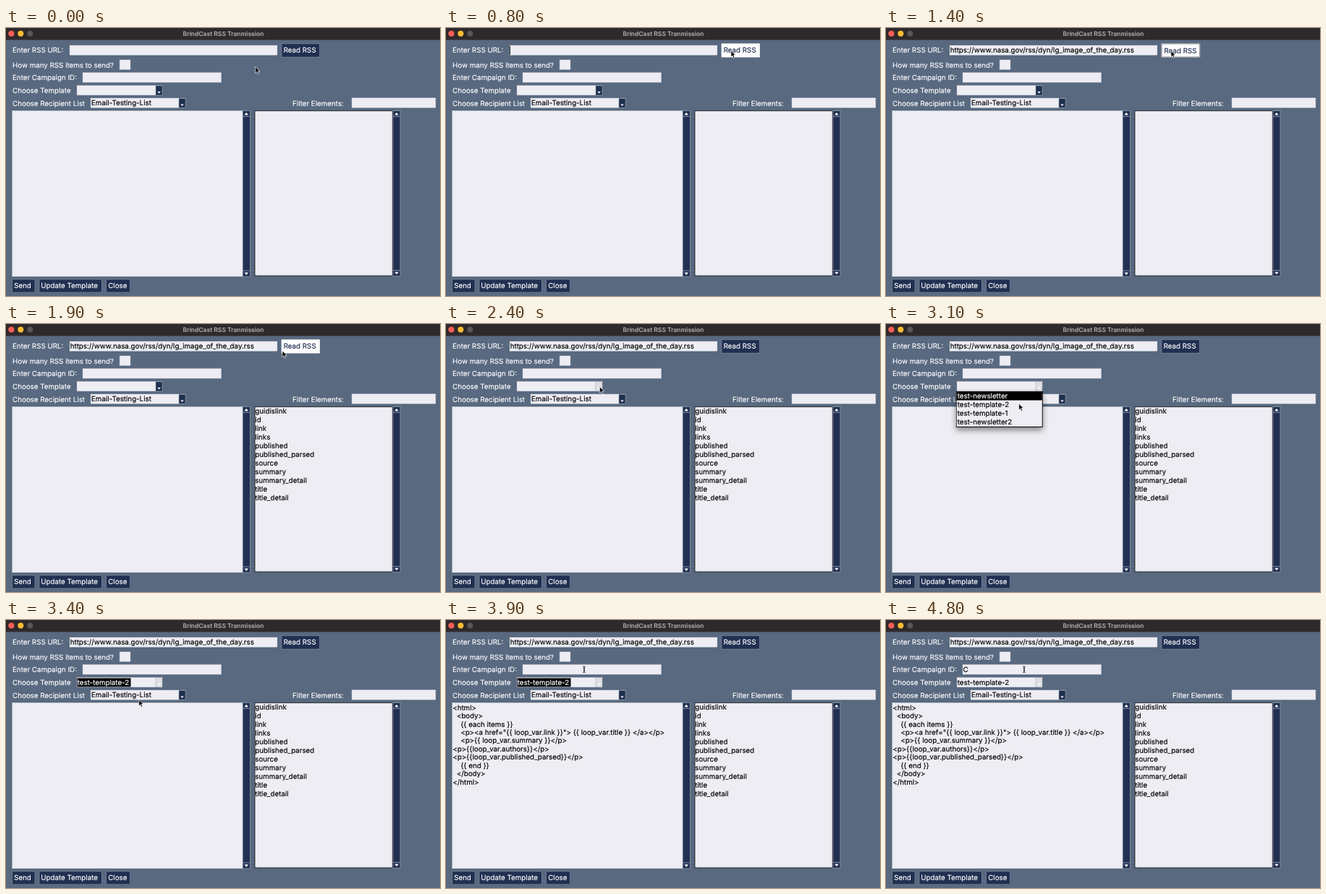
Animation, 600 px wide and 371 px high, one loop 5000 ms. Source, as an HTML page:

```html
<!DOCTYPE html>
<html lang="en">
<head>
<meta charset="utf-8">
<title>RSS form</title>
<style>
  html, body { margin: 0; width: 100%; height: 100%; overflow: hidden; background: #586980; }
  svg { display: block; width: 100%; height: 100%; }
  text {
    font: 9.77px Inter, "Open Sans", sans-serif;
    white-space: pre;
    text-rendering: geometricPrecision;
    stroke-width: .15px;
  }
  .title { font-size: 8.5px; font-weight: 600; }
</style>
</head>
<body>
<svg id="stage" viewBox="0 0 600 371"></svg>
<script>
const LOOP = 5000, STEP = 100;
const NAVY = '#213052', FIELD = '#ededf3', WHITE = '#fff', BLACK = '#000', ACTIVE = '#dfdfe4';
const stage = document.getElementById('stage');

function add(tag, attrs, parent = stage) {
  const node = document.createElementNS('http://www.w3.org/2000/svg', tag);
  for (const key in attrs) node.setAttribute(key, attrs[key]);
  parent.appendChild(node);
  return node;
}
const group = () => add('g', {});
const box = (x, y, right, bottom, fill, parent, extra) =>
  add('rect', { x, y, width: right - x, height: bottom - y, fill, ...extra }, parent);
function label(x, y, words, fill = WHITE, parent = stage, extra = {}) {
  const node = add('text', { x, y, fill, stroke: fill, ...extra }, parent);
  node.textContent = words;
  return node;
}
const lines = (x, y, pitch, rows, parent) =>
  rows.map((row, i) => label(x, y + i * pitch, row, BLACK, parent));
const show = (node, on) => node.setAttribute('visibility', on ? 'visible' : 'hidden');

const field = (x, y, right, bottom) =>
  box(x, y, right, bottom, FIELD, stage, { stroke: '#a9b0bb', 'stroke-width': .4 });

function button(x, y, right, bottom, words, textX) {
  const face = box(x, y, right, bottom, NAVY, stage, { stroke: '#8b919b', 'stroke-width': .6 });
  return { face, text: label(textX, (y + bottom) / 2 + 3.3, words) };
}

function combo(x, y, right, bottom) {
  field(x, y, right, bottom);
  const arrow = box(right - 9, y + .4, right, bottom, NAVY, stage, { stroke: '#9aa1ad', 'stroke-width': .5 });
  add('path', { d: `M${right - 6.7} ${y + 8.5}h4.6l-2.3 2.6z`, fill: WHITE });
  return arrow;
}

function scrollbar(x, bottom) {
  box(x, 114.5, x + 10, bottom, NAVY, stage, { stroke: '#aab0ba', 'stroke-width': .6 });
  for (const y of [122.5, bottom - 8])
    box(x, y - .3, x + 10, y + .3, '#b6bcc6');
  add('path', { d: `M${x + 2.2} 120.5h5.6l-2.8-3.6zM${x + 2.2} ${bottom - 5.6}h5.6l-2.8 3.6z`, fill: WHITE });
}

// Window and form
box(0, 0, 600, 371, '#586980');
box(0, 0, 600, 16.5, '#2e292b');
['#ff5f57', '#febc2e', '#5a5557'].forEach((fill, i) => add('circle', { cx: 7.3 + i * 13, cy: 7.8, r: 4, fill }));
label(300.5, 10.7, 'BrindCast RSS Tranmission', '#aaa6a7', stage, { class: 'title', 'text-anchor': 'middle' });

label(9, 34.3, 'Enter RSS URL:');
field(88, 24, 375, 37.7);
const readButton = button(381, 21.8, 433.7, 40.2, 'Read RSS', 383.7);
label(9, 54.5, 'How many RSS items to send?');
field(157, 44, 172, 57.7);
label(9, 72.3, 'Enter Campaign ID:');
field(106, 61.7, 297.7, 75.3);
label(9, 90.2, 'Choose Template');
const templateArrow = combo(98, 79.5, 216, 93);
label(9, 107.6, 'Choose Recipient List');
combo(117, 97, 248, 110.5);
label(118, 107.3, 'Email-Testing-List', BLACK);
label(396, 107.6, 'Filter Elements:');
field(478, 96.8, 594, 110.5);

field(8.5, 114.5, 327, 344);
scrollbar(327.3, 344);
box(344, 114.7, 534.3, 343, FIELD, stage, { stroke: '#14161c', 'stroke-width': .9 });
scrollbar(535, 343.3);

button(8.7, 348, 40, 366, 'Send', 11);
button(46, 348, 132.3, 366, 'Update Template', 48.3);
button(138.3, 348, 171.7, 366, 'Close', 141.2);

// Changing contents
const url = label(88.7, 34.3, 'https://www.nasa.gov/rss/dyn/lg_image_of_the_day.rss', BLACK);
const urlCaret = box(88.2, 25, 89, 37, BLACK);
const campaign = label(106.5, 72.3, 'C', BLACK);
const campaignCaret = box(106.7, 62.7, 107.5, 74.5, BLACK);
const selection = box(98.5, 80.5, 172.5, 92.5, BLACK);
const chosen = label(98.7, 89.9, 'test-template-2');

const elements = group();
lines(344.3, 124.4, 12, ['guidislink', 'id', 'link', 'links', 'published', 'published_parsed',
  'source', 'summary', 'summary_detail', 'title', 'title_detail'], elements);

const markup = group();
lines(9.2, 124.6, 11.45, [
  '<html>',
  '  <body>',
  '    {{ each items }}',
  '    <p><a href="{{ loop_var.link }}"> {{ loop_var.title }} </a></p>',
  '    <p>{{ loop_var.summary }}</p>',
  '<p>{{loop_var.authors}}</p>',
  '<p>{{loop_var.published_parsed}}</p>',
  '    {{ end }}',
  '  </body>',
  '</html>'
], markup);

const menu = group();
const blur = add('filter', { id: 'blur', x: '-20%', y: '-40%', width: '140%', height: '180%' }, add('defs', {}));
add('feGaussianBlur', { stdDeviation: 4 }, blur);
box(97, 97, 216.5, 147, BLACK, menu, { opacity: .45, filter: 'url(#blur)' });
box(97, 93, 216.7, 143, BLACK, menu);
box(97.7, 93.7, 215.8, 142, FIELD, menu);
const highlight = box(97.7, 93.7, 215.8, 105.6, BLACK, menu);
const options = lines(98.7, 103, 12,
  ['test-newsletter', 'test-template-2', 'test-template-1', 'test-newsletter2'], menu);

const arrow = add('path', {
  d: 'M0 0V8.7L2 6.9L3.5 10.2L5 9.5L3.6 6.3H6.3Z',
  fill: BLACK, stroke: WHITE, 'stroke-width': .7, 'stroke-linejoin': 'round'
});
const beam = add('path', {
  d: 'M-1.8-4.2Q0-4.2 0-3V3Q0 4.2-1.8 4.2M1.8-4.2Q0-4.2 0-3V3Q0 4.2 1.8 4.2',
  fill: 'none', stroke: BLACK, 'stroke-width': .8
});

// Pointer stops: time, x, y
const stops = [
  [0, 344.7, 53.7], [100, 339, 62], [200, 322, 48], [300, 306, 34], [400, 302, 31],
  [500, 302, 31], [600, 316, 31], [700, 364, 30], [800, 394, 31.5], [1800, 394, 31.5],
  [1900, 382, 37], [2100, 285, 72], [2300, 215, 88], [2400, 212.3, 86.7], [2600, 212.3, 86.7],
  [2800, 202, 97], [3100, 183.7, 110.3], [3500, 183.7, 110.3], [3700, 190, 75],
  [3900, 191, 68.5], [LOOP, 191, 68.5]
];

function pointerAt(t) {
  const i = stops.findIndex(stop => stop[0] > t);
  const [t0, x0, y0] = stops[i - 1], [t1, x1, y1] = stops[i];
  const k = (t - t0) / (t1 - t0);
  return [x0 + (x1 - x0) * k, y0 + (y1 - y0) * k];
}

function paint(node, fill) {
  node.setAttribute('fill', fill);
  if (node.tagName === 'text') node.setAttribute('stroke', fill);
}

function render(time) {
  const t = Math.floor(time % LOOP / STEP) * STEP;
  const during = (from, to = LOOP) => t >= from && t < to;

  const place = `translate(${pointerAt(t).join(' ')})`;
  const typing = during(300, 700) || during(3800);
  arrow.setAttribute('transform', place);
  beam.setAttribute('transform', place);
  show(arrow, !typing);
  show(beam, typing);

  const hovered = during(800, 2000), pressed = during(1200, 1900);
  paint(readButton.face, hovered ? WHITE : NAVY);
  paint(readButton.text, hovered ? NAVY : WHITE);
  readButton.face.setAttribute('stroke', pressed ? '#a3a3a6' : hovered ? WHITE : '#8b919b');
  readButton.face.setAttribute('stroke-width', pressed ? 1.6 : .6);
  readButton.text.setAttribute('transform', pressed ? 'translate(.8 .6)' : '');

  show(urlCaret, during(400, 900));
  show(url, during(900));
  show(elements, during(1800));
  paint(templateArrow, during(2400) ? ACTIVE : NAVY);

  const row = during(3200) ? 1 : 0;
  show(menu, during(2700, 3400));
  highlight.setAttribute('y', 93.7 + row * 12);
  options.forEach((option, i) => paint(option, i === row ? WHITE : BLACK));

  const selected = during(3400, 4200);
  show(selection, selected);
  show(chosen, during(3400));
  paint(chosen, selected ? WHITE : BLACK);
  show(markup, during(3800));
  show(campaignCaret, during(4300, 4800));
  show(campaign, during(4800));
}

const start = performance.now();
function tick() {
  render(performance.now() - start);
  requestAnimationFrame(tick);
}
tick();
</script>
</body>
</html>
```
